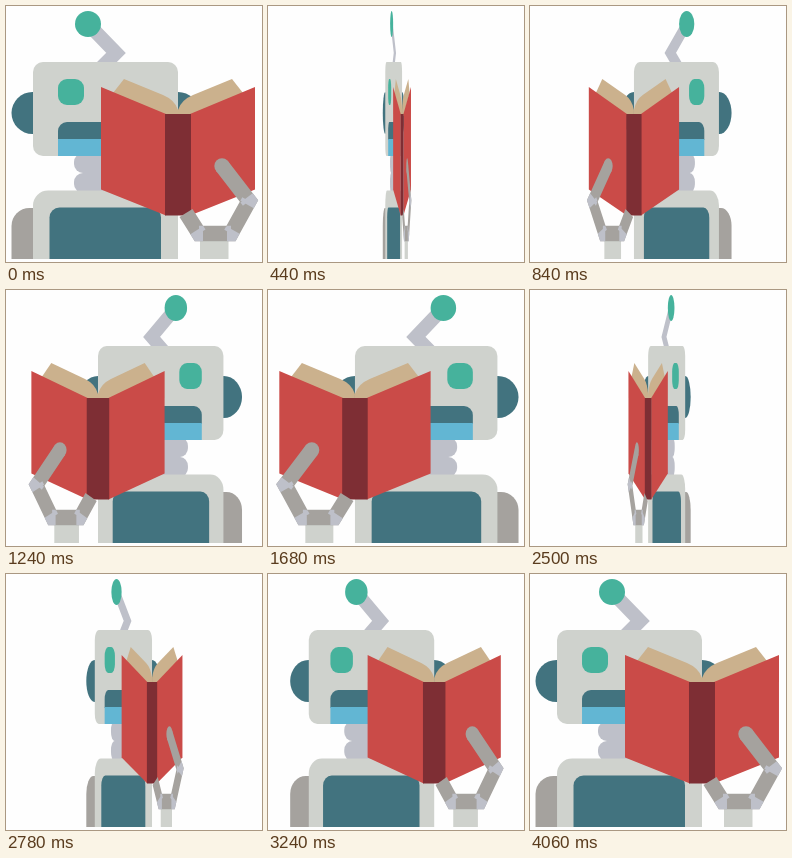
Animation of 256x256 px, one loop 4.08 s. Source, as an HTML page with a canvas:

```html
<!DOCTYPE html>
<html lang="en">
<head>
<meta charset="utf-8">
<title>Reading robot</title>
<style>
html, body { margin: 0; width: 100%; height: 100%; overflow: hidden; background: #fefefe; }
canvas { display: block; width: 100vw; height: 100vh; }
</style>
</head>
<body>
<canvas id="stage"></canvas>
<script>
const canvas = document.getElementById('stage');
const ctx = canvas.getContext('2d');
const LOOP = 4080, AXIS = 129.1, BOOK_MID = 172;
const HALF_TURN = 44; // steps
const C = {
  shell: '#cfd2cd', steel: '#bec0c9', grey: '#a5a29e', teal: '#42737f', green: '#46b29c',
  blue: '#62b6d3', red: '#ca4b48', wine: '#7e2e34', page: '#cbb18d'
};

// Cubic Bezier easing, solved by bisection
function bezier(x1, y1, x2, y2) {
  const at = (a, b, s) => 3 * a * s * (1 - s) ** 2 + 3 * b * s * s * (1 - s) + s ** 3;
  return p => {
    let lo = 0, hi = 1;
    for (let i = 0; i < 24; i++) {
      const mid = (lo + hi) / 2;
      if (at(x1, x2, mid) < p) lo = mid; else hi = mid;
    }
    return at(y1, y2, lo);
  };
}
const ease = bezier(0.22, 0.18, 0.06, 0.735);

// Three poses every 140 ms, the middle one held longer
function stepAt(ms) {
  const r = ms % 140;
  return 3 * Math.floor(ms / 140) + (r < 20 ? 0 : r < 120 ? 1 : 2);
}

function angleAt(ms) {
  const p = stepAt(ms) / HALF_TURN;
  return Math.PI * (Math.floor(p) + ease(p % 1));
}

function shape(color, d) {
  ctx.fillStyle = color;
  ctx.fill(new Path2D(d));
}

function box(color, x, y, w, h, r = 0) {
  ctx.fillStyle = color;
  ctx.beginPath();
  ctx.roundRect(x, y, w, h, r);
  ctx.fill();
}

function disc(color, x, y, r) {
  box(color, x - r, y - r, 2 * r, 2 * r, r);
}

function rod(color, width, points) {
  ctx.strokeStyle = color;
  ctx.lineWidth = width;
  ctx.beginPath();
  points.forEach(p => ctx.lineTo(...p));
  ctx.stroke();
}

// Point a given distance from one point towards another
function toward([x, y], [u, v], dist) {
  const k = dist / Math.hypot(u - x, v - y);
  return [x + (u - x) * k, y + (v - y) * k];
}

function drawRobot() {
  rod(C.steel, 14, [[82, 18], [110, 47], [92, 65]]);
  disc(C.green, 82, 18, 13);
  for (const x of [26.5, 172]) disc(C.teal, x, 107, 21);
  for (const y of [147, 167]) box(C.steel, 68, y, 60, 20, 9);
  box(C.shell, 27, 56, 145, 94, 10);
  box(C.green, 52, 73, 26, 26, 9);
  box(C.teal, 52, 116, 94, 18, [9, 0, 0, 0]);
  box(C.blue, 52, 133, 94, 17);
  box(C.grey, 5.5, 202, 30, 51, [18, 0, 0, 0]);
  box(C.shell, 27, 184.5, 145, 68.5, [15, 15, 0, 0]);
  box(C.teal, 43.5, 201.5, 111.5, 51.5, [10, 10, 0, 0]);
}

function drawBook() {
  for (const side of [1, -1]) {
    ctx.save();
    ctx.translate(BOOK_MID, 0);
    ctx.scale(side, 1);
    shape(C.page, 'M-65 87L-54 73L-15 89Q-3 94 0 104V110H-14Z');
    shape(C.red, 'M-77 81L-12 108V209.5L-77 183.5Z');
    ctx.restore();
  }
  box(C.wine, BOOK_MID - 13, 108, 26, 101.5);
}

function drawArm() {
  const arm = [[216, 160], [243, 195], [225, 227.5], [193, 227.5], [180, 207]];
  box(C.shell, 194, 234, 28.5, 19);
  disc(C.grey, ...arm[0], 7.7);
  rod(C.grey, 15.4, arm);
  for (let i = 1; i < arm.length - 1; i++) {
    const bend = arm[i];
    rod(C.steel, 15.4, [toward(bend, arm[i - 1], 4), bend, toward(bend, arm[i + 1], 4)]);
  }
}

function resize() {
  const d = window.devicePixelRatio || 1;
  canvas.width = Math.round(innerWidth * d);
  canvas.height = Math.round(innerHeight * d);
}

function draw(ms) {
  ctx.setTransform(canvas.width / 256, 0, 0, canvas.height / 256, 0, 0);
  box('#fefefe', 0, 0, 256, 256);
  ctx.translate(AXIS, 0);
  ctx.scale(Math.cos(angleAt(ms)), 1);
  ctx.translate(-AXIS, 0);
  drawRobot();
  drawBook();
  drawArm();
}

const start = performance.now();
function tick() {
  draw((performance.now() - start) % LOOP);
  requestAnimationFrame(tick);
}

addEventListener('resize', resize);
resize();
tick();
</script>
</body>
</html>
```
